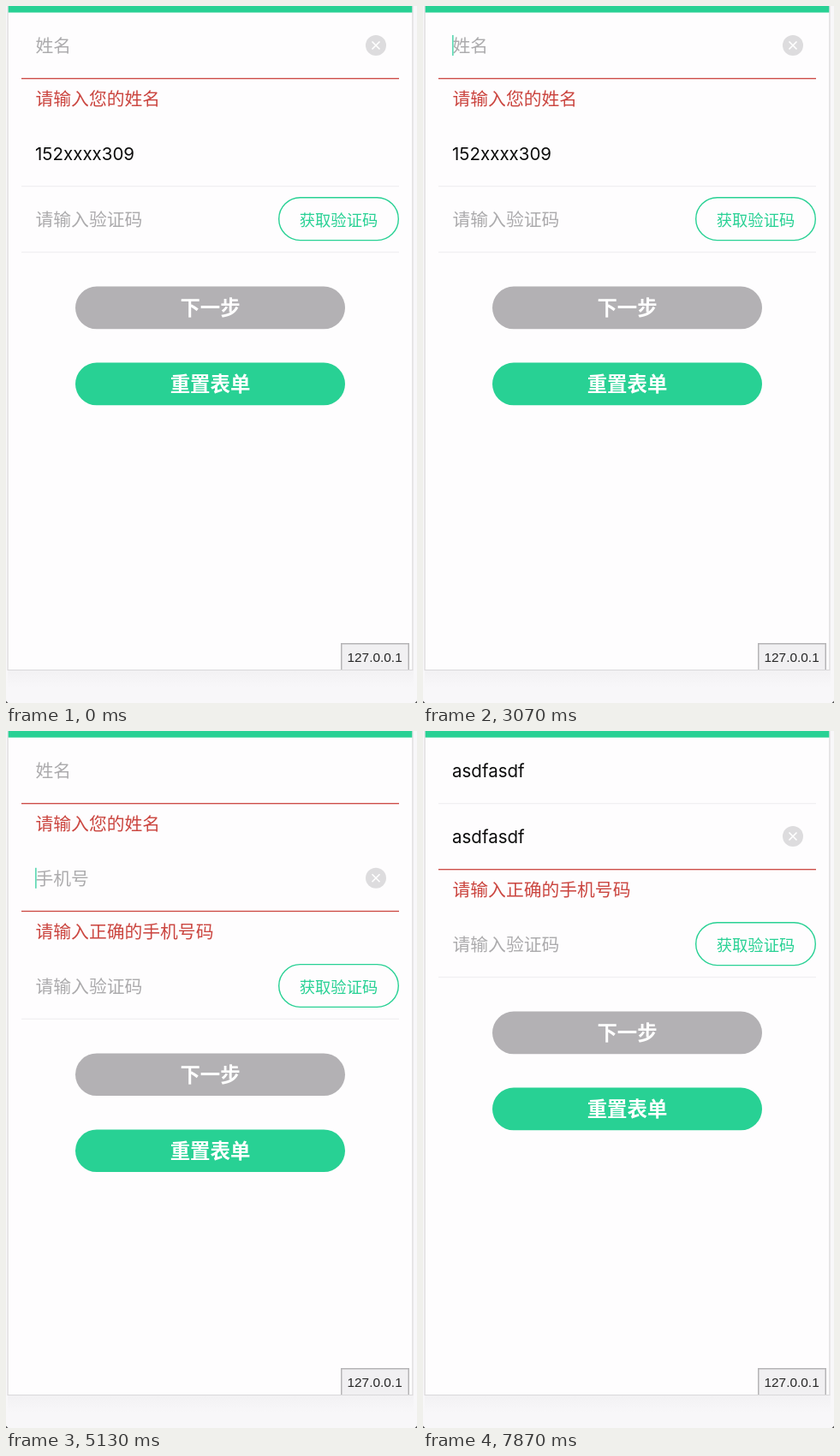
Animation, 480 px wide and 814 px high, one loop 8000 ms. Source, as an HTML page with a canvas:

```html
<!DOCTYPE html>
<html lang="zh-CN">
<head>
<meta charset="utf-8">
<title>表单</title>
<style>
html, body { margin: 0; width: 100%; height: 100%; overflow: hidden; background: #f8f7f9; }
canvas { display: block; width: 480px; height: 814px; }
</style>
</head>
<body>
<canvas id="stage" width="480" height="814"></canvas>
<script>
const ctx = document.getElementById('stage').getContext('2d');
const LOOP = 8000, ROW = 77, ERROR_H = 48.8;
const CJK = '"Noto Sans CJK SC", "Noto Sans CJK", sans-serif';
const LATIN = 'Inter, Roboto, sans-serif';
const GREEN = '#28d194', RED = '#cb4640', HINT = '#acabad';
const PHONE = '152xxxx309', TYPED = 'asdfasdf';

// Each step: time, focused field, name value, phone value
const steps = [];
const add = (at, focus, name, phone) => steps.push({ at, focus, name, phone });
function type(from, gap, focus, make) {
  for (let i = 1; i <= TYPED.length; i++) {
    add(from + (i - 1) * gap, focus, ...make(TYPED.slice(0, i)));
  }
}
add(-800, 'name', '', PHONE);
type(1270, 66, 'name', s => [s, PHONE]);
add(3070, 'name', '', PHONE);
add(4100, 'phone', '', PHONE);
add(5130, 'phone', '', '');
add(5840, 'name', '', '');
type(6130, 60, 'name', s => [s, '']);
add(6760, 'phone', TYPED, '');
type(6870, 55, 'phone', s => [TYPED, s]);

function stateAt(t) {
  let cur = steps[0];
  for (const s of steps) if (s.at <= t) cur = s;
  return cur;
}

function caretOn(t, s) {
  if (s.name === TYPED && s.focus === 'name') return true;
  return (t - s.at) % 1000 < 500;
}

function text(str, x, y, font, color, align = 'left') {
  ctx.font = font;
  ctx.fillStyle = color;
  ctx.textAlign = align;
  ctx.fillText(str, x, y);
}

function rect(x, y, w, h, color) {
  ctx.fillStyle = color;
  ctx.fillRect(x, y, w, h);
}

function pill(x, y, w, h) {
  ctx.beginPath();
  ctx.roundRect(x, y, w, h, h / 2);
}

function clearIcon(x, y) {
  ctx.fillStyle = '#dddcde';
  ctx.beginPath();
  ctx.arc(x, y, 12, 0, Math.PI * 2);
  ctx.fill();
  ctx.strokeStyle = '#fff';
  ctx.lineWidth = 1.6;
  ctx.beginPath();
  ctx.moveTo(x - 4.5, y - 4.5);
  ctx.lineTo(x + 4.5, y + 4.5);
  ctx.moveTo(x + 4.5, y - 4.5);
  ctx.lineTo(x - 4.5, y + 4.5);
  ctx.stroke();
}

function underline(y, color, h = 1.3) {
  rect(18, y - h / 2, 441, h, color);
}

// Draws one field and returns the top of the next row
function field(top, value, hint, error, focused, caret) {
  const base = top + 46;
  const font = `20.5px ${LATIN}`;
  if (value) text(value, 34, base, font, '#0c0c0c');
  else text(hint, 34.5, base, `20.8px ${CJK}`, HINT);
  if (focused) {
    clearIcon(432, top + 38);
    if (caret) {
      ctx.font = font;
      const w = value ? ctx.measureText(value).width : 0;
      rect(34 + w, top + 26, 1.7, 24, '#62d9b5');
    }
  }
  const line = top + 76.7;
  if (error) {
    underline(line, RED);
    text(error, 34.5, top + 108, `500 20.8px ${CJK}`, RED);
    return top + ROW + ERROR_H;
  }
  underline(line, focused ? '#8fe2c9' : '#f1f0f2');
  return top + ROW;
}

function button(y, label, color) {
  pill(81, y, 315, 49.7);
  ctx.fillStyle = color;
  ctx.fill();
  text(label, 238.5, y + 33.4, `bold 23.4px ${CJK}`, '#fff', 'center');
}

function page() {
  rect(0, 0, 480, 814, '#f8f7f9');
  const shade = ctx.createLinearGradient(0, 775, 0, 796);
  shade.addColorStop(0, '#f2f1f3');
  shade.addColorStop(1, '#f8f7f9');
  rect(2, 775, 474, 21, shade);
  rect(1.5, 0, 474, 776, '#d9d8da');
  rect(2.7, 0, 471.6, 775, '#fefdfe');
  rect(2.7, 0, 471.6, 7.6, GREEN);
  ctx.fillStyle = '#555';
  for (const [x, dx] of [[0, 2.5], [480, -2.5]]) {
    ctx.beginPath();
    ctx.moveTo(x, 811.5);
    ctx.lineTo(x + dx, 814);
    ctx.lineTo(x, 814);
    ctx.fill();
  }
}

function statusBox() {
  rect(391, 744, 80, 31, '#b5b4b6');
  rect(392.5, 745.5, 77, 29.5, '#f1f0f2');
  text('127.0.0.1', 398.5, 766, '15.4px "Liberation Sans", Arial, sans-serif', '#262626');
}

function draw(t) {
  const s = stateAt(t);
  const caret = caretOn(t, s);
  page();
  let y = field(8, s.name, '姓名', s.name ? '' : '请输入您的姓名',
    s.focus === 'name', caret);
  y = field(y, s.phone, '手机号', s.phone === PHONE ? '' : '请输入正确的手机号码',
    s.focus === 'phone', caret);
  const codeTop = y;
  y = field(y, '', '请输入验证码', '', false, false);

  pill(318.7, codeTop + 13, 139.6, 49.8);
  ctx.strokeStyle = GREEN;
  ctx.lineWidth = 1.4;
  ctx.stroke();
  text('获取验证码', 388.5, codeTop + 46, `500 18.3px ${CJK}`, GREEN, 'center');

  button(y + 39.8, '下一步', '#b3b1b4');
  button(y + 128.8, '重置表单', GREEN);
  statusBox();
}

const start = performance.now();
function tick() {
  draw((performance.now() - start) % LOOP);
  requestAnimationFrame(tick);
}
tick();
</script>
</body>
</html>
```
